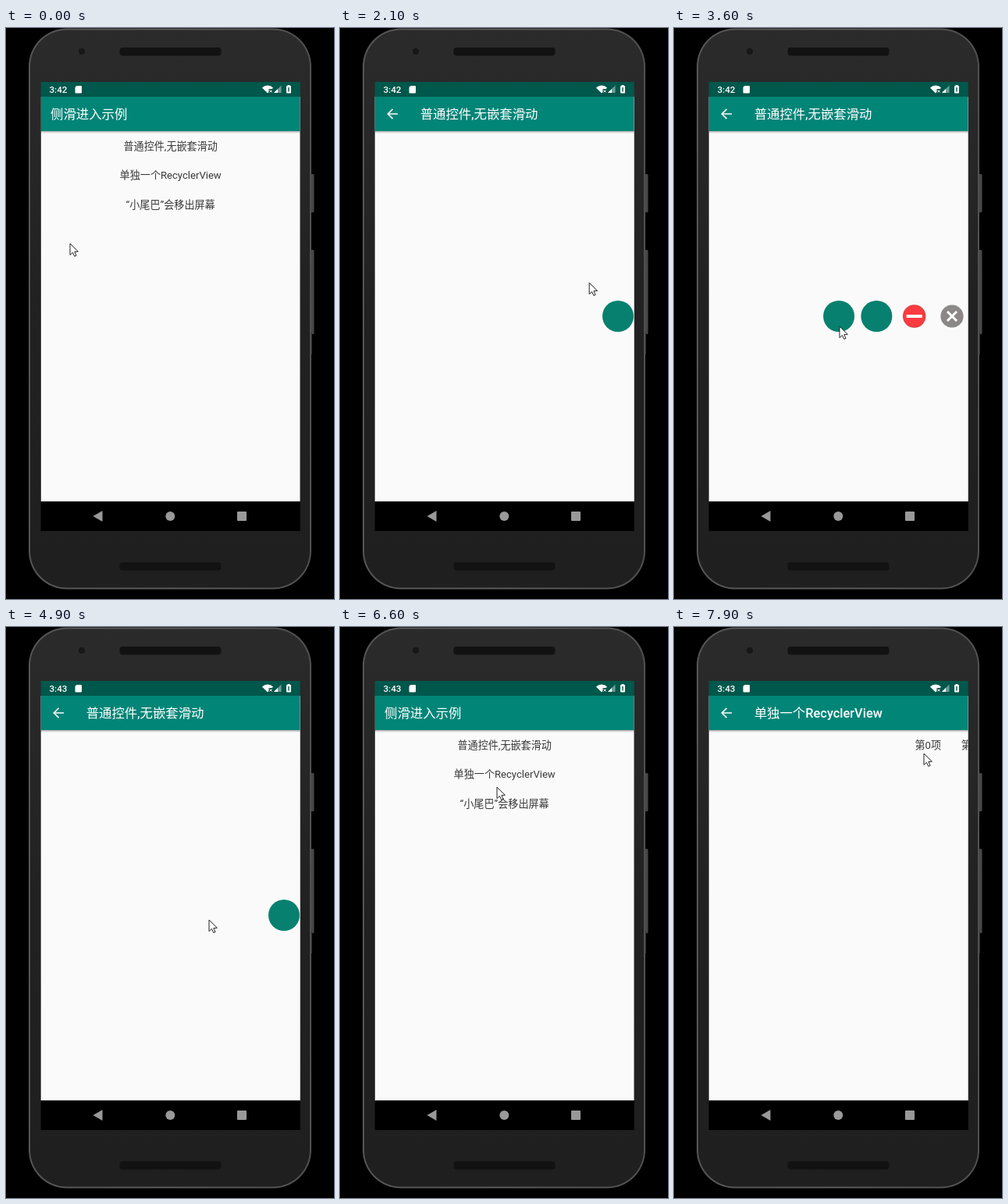
Write an HTML page with a canvas that moves like this. It is 420 px wide and 731 px high and loops after 8 s.

```html
<!DOCTYPE html>
<html lang="zh-CN">
<head>
<meta charset="utf-8">
<style>
html, body { margin: 0; width: 100%; height: 100%; overflow: hidden; background: #000; }
canvas { display: block; width: 420px; height: 731px; }
</style>
</head>
<body>
<canvas id="stage" width="420" height="731"></canvas>
<script>
const c = document.getElementById('stage').getContext('2d');
const LOOP = 8000, STEP = 100;
const FONT = 'Roboto, "Noto Sans CJK SC", "Noto Sans CJK", sans-serif';
const LEFT = 44.6, WIDTH = 332.1, MID = LEFT + WIDTH / 2;
const BAR = 88, BODY = 132, NAV = 606.3;
const TEAL = '#008577', DARK_TEAL = '#00574b', INK = '#383838';

// the pointer's moves: from time, to time, new place
const moves = [
  [200, 1000, 234, 161],
  [1500, 2400, 349, 384],
  [2700, 3500, 212, 382],
  [3900, 4700, 260, 375],
  [5000, 5600, 67, 112],
  [5900, 6600, 201, 205],
  [7100, 7900, 320, 162]
];

const lerp = (a, b, p) => a + (b - a) * p;

function ramp(t, from, to) {
  const p = Math.min(1, Math.max(0, (t - from) / (to - from)));
  return p * p * (3 - 2 * p);
}

function pointerAt(t) {
  return moves.reduce(([x, y], [from, to, nx, ny]) => {
    const p = ramp(t, from, to);
    return [lerp(x, nx, p), lerp(y, ny, p)];
  }, [82, 276]);
}

function rect(x, y, w, h, color) {
  c.fillStyle = color;
  c.fillRect(x, y, w, h);
}

function round(x, y, w, h, r, color) {
  c.fillStyle = color;
  c.beginPath();
  c.roundRect(x, y, w, h, r);
  c.fill();
}

function disc(x, y, r, color) {
  round(x - r, y - r, 2 * r, 2 * r, r, color);
}

function trace(points, closed) {
  c.beginPath();
  points.forEach(p => c.lineTo(...p));
  if (closed) c.closePath();
}

function poly(points, color) {
  trace(points, true);
  c.fillStyle = color;
  c.fill();
}

function line(points, width, color = '#fff') {
  trace(points);
  c.lineWidth = width;
  c.strokeStyle = color;
  c.stroke();
}

function cross(x, y, r, width) {
  for (const s of [-1, 1]) line([[x - r, y - r * s], [x + r, y + r * s]], width);
}

function text(str, x, y, size, color, weight = 400, align = 'left') {
  c.font = `${weight} ${size}px ${FONT}`;
  c.textAlign = align;
  c.fillStyle = color;
  c.fillText(str, x, y);
  return c.measureText(str).width;
}

const title = (str, x, weight) => text(str, x, 116, 16.4, '#fff', weight);
const label = (str, x, row) => text(str, x, 155.6 + row * 37.6, 13.1, INK, 400, 'center');

function fade(x0, y0, x1, y1, ...colors) {
  const g = c.createLinearGradient(x0, y0, x1, y1);
  colors.forEach((k, i) => g.addColorStop(i / (colors.length - 1), k));
  return g;
}

function phone() {
  rect(0, 0, 420, 731, '#000');
  for (const [y, h] of [[187, 49], [284, 108]]) round(388, y, 6.5, h, 1.5, '#474747');
  round(388, 390, 4, 28, 1, '#2b2b2b');
  round(29, 0.5, 362, 718, 49, fade(29, 0, 391, 0, '#555', '#5c5c5c', '#505050'));
  round(31, 2.5, 358, 714, 47, fade(0, 0, 0, 718, '#2b2b2b', '#212121', '#1f1f1f'));
  for (const y of [25, 684]) round(145.5, y, 130, 10.5, 4, '#121212');
  disc(97, 30, 4, '#171717');
}

function statusBar(t) {
  rect(LEFT, 69, WIDTH, BAR - 69, DARK_TEAL);
  text(t < 4300 ? '3:42' : '3:43', 55.5, 83, 11.6, '#fff', 500);
  round(88.5, 74, 8.5, 9.5, [3, 1, 1, 1], '#fff');

  c.fillStyle = '#fff';
  c.beginPath();
  c.moveTo(335, 83.5);
  c.arc(335, 83.5, 10, -Math.PI * 0.75, -Math.PI * 0.25);
  c.fill();
  rect(336.5, 78, 5, 6, DARK_TEAL);
  cross(339, 81, 1.5, 1);

  const wedge = (size, color) =>
    poly([[343, 83], [343 + size, 83], [343 + size, 83 - size]], color);
  wedge(9.5, '#6c9b94');
  wedge(5, '#fff');

  round(359, 74, 6, 9.5, 1, '#fff');
  rect(360.5, 73, 3, 1, '#fff');
  rect(361.3, 76, 1.4, 5.5, DARK_TEAL);
}

function navBar() {
  rect(LEFT, NAV, WIDTH, 644 - NAV, '#000');
  poly([[111.5, 625], [123.5, 618], [123.5, 632]], '#999');
  disc(210.3, 625, 6, '#999');
  round(296, 619, 12, 12, 1, '#999');
}

function backArrow() {
  line([[61, 110], [74, 110]], 1.7);
  line([[67.5, 103.8], [61.3, 110], [67.5, 116.2]], 1.7);
}

function homePage() {
  title('侧滑进入示例', 57);
  ['普通控件,无嵌套滑动', '单独一个RecyclerView', '“小尾巴”会移出屏幕']
    .forEach((s, i) => label(s, MID, i));
}

function trayPage(t) {
  backArrow();
  title('普通控件,无嵌套滑动', 102.7);
  const open = ramp(t, 2700, 3500) - ramp(t, 3900, 4700);
  const y = 369, gap = 48.3;
  const [a, b, minus, close] = [0, 1, 2, 3].map(i => 356 + gap * (i - 3 * open));
  disc(a, y, 20, '#07806f');
  disc(b, y, 20, '#07806f');
  disc(minus, y, 14.7, '#c9474a');
  disc(minus, y, 13.9, '#fb3b40');
  rect(minus - 10, y - 2, 20, 4, '#fff');
  disc(close, y, 14.6, '#8c8888');
  cross(close, y, 6, 3);
}

function listPage() {
  backArrow();
  const w = title('单独一个', 102.7);
  title('RecyclerView', 102.7 + w, 500);
  for (let i = 0; i < 2; i++) label(`第${i}项`, 325.3 + i * 59.3, 0);
}

function page(content, t, shown = 1) {
  if (shown <= 0) return;
  c.save();
  c.beginPath();
  c.rect(LEFT, BAR, WIDTH, NAV - BAR);
  c.clip();
  c.globalAlpha = shown;
  c.translate(0, 36 * (1 - shown));
  rect(LEFT, BAR, WIDTH, NAV - BAR, '#fafafa');
  rect(LEFT, BODY, WIDTH, 3, fade(0, BODY, 0, BODY + 3, 'rgba(0,0,0,.3)', 'rgba(0,0,0,0)'));
  rect(LEFT, BAR, WIDTH, BODY - BAR, TEAL);
  content(t);
  c.restore();
}

function cursor(t) {
  c.save();
  c.translate(...pointerAt(t));
  trace([[0, 0], [0, 14.5], [3.4, 11.4], [5.8, 16.4], [8, 15.3], [5.8, 10.5], [10.4, 10.2]], true);
  c.fillStyle = '#fff';
  c.fill();
  c.lineWidth = 1;
  c.strokeStyle = '#222';
  c.stroke();
  c.restore();
}

function draw(t) {
  phone();
  page(homePage, t);
  page(trayPage, t, ramp(t, 1300, 1700) - ramp(t, 5900, 6300));
  page(listPage, t, ramp(t, 6900, 7300));
  statusBar(t);
  navBar();
  cursor(t);
}

const start = performance.now();
function tick() {
  const t = (performance.now() - start) % LOOP;
  draw(Math.floor(t / STEP) * STEP);
  requestAnimationFrame(tick);
}
tick();
</script>
</body>
</html>
```
